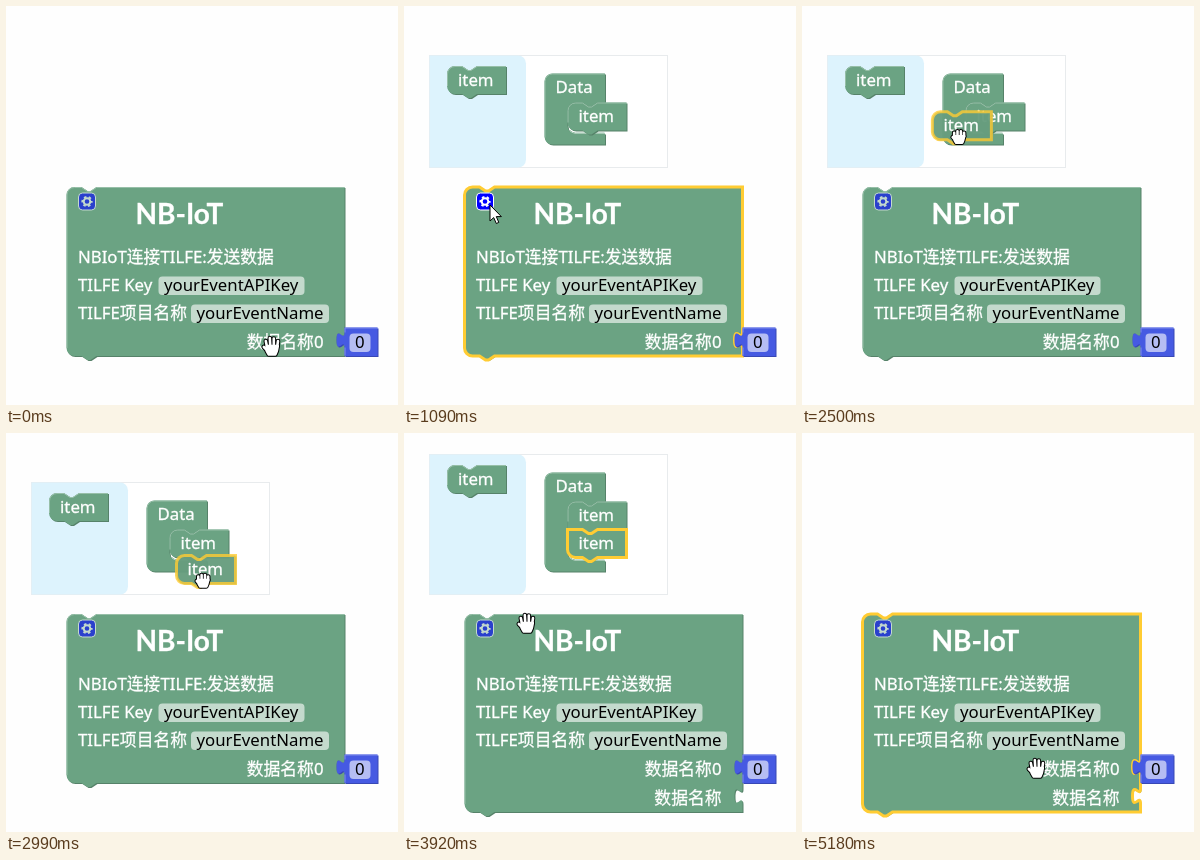
Write an HTML page that moves like this. It is 392 px wide and 399 px high and loops after 5250 ms.

```html
<!DOCTYPE html>
<html lang="zh">
<head>
<meta charset="utf-8">
<title>NB-IoT block</title>
<style>
html, body { margin: 0; width: 100%; height: 100%; overflow: hidden; background: #fefefe; }
svg { display: block; width: 392px; height: 399px; }
text {
  font: 16.8px "Noto Sans", "Noto Sans CJK SC", "Noto Sans CJK", sans-serif;
  fill: #fff; stroke: #fff; stroke-width: .3;
}
.face { fill: #6ba383; }
.dark { fill: #568269; }
.light { fill: none; stroke: #97bfa8; }
.number .face { fill: #465ae2; }
.number .dark { fill: #3848b5; }
.number .light { stroke: #7e8ceb; }
.sel .face { stroke: #fc3; stroke-width: 3; }
.sel .light { display: none; }
.drag .face, .drag .dark { fill-opacity: .8; stroke-opacity: .8; }
.field rect { fill: #fff; fill-opacity: .6; }
.field.over rect { fill-opacity: .8; }
.field text { fill: #000; stroke: none; }
#gear { opacity: .6; }
#gear.over { opacity: 1; }
.title { font: bold 28px Lato, sans-serif; }
.end { text-anchor: end; }
.off { display: none; }
</style>
</head>
<body>
<svg id="stage" viewBox="0 0 392 399"></svg>
<script>
const LOOP = 5250;
const stage = document.getElementById('stage');

const NOTCH = 'H15l6 4 3 0 6-4';
const NOTCH_BACK = 'l-6 4-3 0-6-4';
const CORNER = 'M0 8A8 8 0 0 1 8 0';
const FOOT = 'H8a8 8 0 0 1-8-8z';
const SOCKET = 'v5c0 10-8-8-8 7.5s8-2.5 8 7.5';

const itemPath = (head = CORNER, foot = FOOT) =>
  `${head}${NOTCH}H59V28H30${NOTCH_BACK}${foot}`;
const numberPath = 'M0 0H33V28.5H0V20c0-10-8 8-8-7.5s8 2.5 8-7.5z';

function mainPath(rows) {
  let d = `${CORNER}${NOTCH}H278`;
  for (let i = 0; i < rows; i++) d += `V${140.5 + 29 * i}${SOCKET}`;
  return `${d}V${140 + 29 * rows}H30${NOTCH_BACK}${FOOT}`;
}

function dataPath(items) {
  const inner = 28 * items - 13;
  return `${CORNER}H60.5V29H53${NOTCH_BACK}h-7a8 8 0 0 0-8 8v${inner}` +
    `a8 8 0 0 0 8 8H60.5v11${FOOT}`;
}

const edge = (w, h, notch) =>
  `M.5 ${h - 8}V8A7.5 7.5 0 0 1 8 .5${notch ? NOTCH : ''}H${w}`;

// Outer edge plus the lit lip under the stacked items
const dataEdge = items =>
  `${edge(60, 44 + 28 * items, false)}M25.5 ${29 + 28 * items}a8 8 0 0 0 5.5 2.5H60`;

function block(id, cls, x, y, d, light, inside = '') {
  return `<g id="${id}" class="${cls}" transform="translate(${x} ${y})">
    <path class="dark" d="${d}" transform="translate(1 1)"/>
    <path class="face" d="${d}"/><path class="light" d="${light}"/>${inside}</g>`;
}

const text = (x, y, s, cls = '') => `<text x="${x}" y="${y}" class="${cls}">${s}</text>`;

const field = (id, x, y, w, s) =>
  `<g id="${id}" class="field"><rect x="${x}" y="${y}" width="${w}" height="18.5" rx="4"/>
  ${text(x + 5.5, y + 14.5, s)}</g>`;

const item = (id, x, y) =>
  block(id, '', x, y, itemPath(), edge(59, 28, true), text(11, 19.5, 'item'));

stage.innerHTML = `
<defs>
  <g id="open" stroke-linecap="round" stroke-linejoin="round">
    <path d="M-5 0L-6-5M-1.5 0L-2-8M2 0V-7.5M5.5 0L6.2-5M-4 5L-8 1"/>
    <path d="M-5 0H6L5 5 3.5 8.5H-3L-5 5z"/>
  </g>
  <g id="fist" stroke-linecap="round" stroke-linejoin="round">
    <path d="M-4.5 0V-3.5M-1.2 0V-5M2.2 0V-5M5.4 0V-3.5M-3 4L-6 1"/>
    <path d="M-4 0H5.5L4.5 4 3.5 6.5H-2.5L-4 4z"/>
  </g>
</defs>
<g id="bubble">
  <rect id="panel" x="25.5" width="238" fill="#fff" stroke="#e8ebed"/>
  <path id="flyout" fill="#ddf3fd"/>
  <g id="content">
    ${item('spare', 43, 60)}
    ${block('data', '', 140.5, 67.5, dataPath(1), dataEdge(1), text(11, 19.5, 'Data'))}
    ${item('first', 163.5, 96.5)}
  </g>
  ${item('moving', 43, 60)}
</g>
${block('main', '', 60.5, 181, mainPath(1), edge(278, 169, true))}
<g id="gear" transform="translate(81 195.5)" fill="none" stroke="#fff">
  <rect x="-8.5" y="-8.5" width="17" height="17" rx="4" fill="#00f"/>
  <circle r="3.3" stroke-width="2"/>
  <circle r="4.7" stroke-width="1.8" stroke-dasharray="2.5 2.42" stroke-dashoffset="1.25"/>
</g>
${text(129.5, 218, 'NB-IoT', 'title')}
${text(72, 257, 'NBIoT连接TILFE:发送数据')}
${text(72, 285, 'TILFE Key')}
${field('key', 152.5, 270.5, 146, 'yourEventAPIKey')}
${text(72, 313, 'TILFE项目名称')}
${field('event', 185, 298.5, 138, 'yourEventName')}
${text(317.5, 342, '数据名称0', 'end')}
<g id="row">${text(317.5, 371, '数据名称', 'end')}</g>
${block('number', 'number', 338.5, 321.5, numberPath, 'M.5 28V20M.5 5V.5H33', field('value', 5, 6, 21, '0'))}
<g id="cursor">
  <g id="hand" transform="translate(.8 0)">
    <use stroke="#000" stroke-width="4.6"/><use fill="#fff" stroke="#fff" stroke-width="2.6"/>
  </g>
  <path id="arrow" d="M0 0V16L3.7 12.6 6.3 18.5 8.8 17.4 6.3 11.6H11.4z" fill="#fff" stroke="#000"/>
</g>`;

const $ = id => document.getElementById(id);
const flag = (id, cls, on) => $(id).classList.toggle(cls, on);
const place = (id, x, y) => $(id).setAttribute('transform', `translate(${x} ${y})`);

// Pointer moves: first step, last step (ms), step count, end x, end y
const moves = [
  [90, 90, 1, 230, 282],
  [160, 550, 6, 105, 220],
  [630, 860, 4, 86, 199],
  [1330, 1330, 1, 100, 194],
  [1560, 2030, 7, 67, 82],
  [2110, 2110, 1, 67, 84],
  [2180, 2600, 6, 167, 136],
  [2670, 2990, 5, 196, 147],
  [3150, 3290, 3, 199, 151],
  [3460, 3530, 2, 199, 153],
  [3700, 3700, 1, 209, 153],
  [3840, 3840, 1, 168, 170],
  [3920, 3920, 1, 122, 190],
  [3990, 4160, 3, 79, 202],
  [4540, 4710, 3, 79, 198],
  [4860, 5180, 5, 234, 335]
];

const easeOut = p => 1 - (1 - p) ** 2;

function pointer(t) {
  let x = 265, y = 340;
  for (const [from, to, n, endX, endY] of moves) {
    if (t < from) break;
    const gap = n > 1 ? (to - from) / (n - 1) : 1;
    const p = easeOut(Math.min(n, 1 + Math.floor((t - from + .5) / gap)) / n);
    x += (endX - x) * p;
    y += (endY - y) * p;
  }
  return [x, y];
}

function setPath(id, d, light) {
  const [dark, face, lit] = $(id).children;
  dark.setAttribute('d', d);
  face.setAttribute('d', d);
  if (light) lit.setAttribute('d', light);
}

function draw(t) {
  const [x, y] = pointer(t);
  const within = (l, top, r, b) => x >= l && x <= r && y >= top && y <= b;
  const during = (a, b) => t >= a && t < b;
  const dragging = during(2180, 3150);
  const joined = t >= 3150;
  const count = joined ? 2 : 1;
  const lift = joined ? 28 : 0;
  const top = 49.5 - lift;

  flag('bubble', 'off', !during(1090, 4860));
  $('panel').setAttribute('y', top);
  $('panel').setAttribute('height', 112 + lift);
  $('flyout').setAttribute('d', `M25.5 ${top}H114a8 8 0 0 1 8 8V153.5a8 8 0 0 1-8 8H25.5z`);
  place('content', 0, -lift);
  setPath('data', dataPath(count), dataEdge(count));

  // Stacked items meet with square corners
  setPath('first', itemPath(CORNER, joined ? 'H0z' : FOOT));
  setPath('moving', itemPath(joined ? 'M0 0' : CORNER),
    joined ? `M.5 20V.5${NOTCH}H59` : edge(59, 28, true));

  flag('moving', 'off', t < 2030);
  flag('moving', 'sel', during(2030, 4310));
  flag('moving', 'drag', dragging);
  if (joined) place('moving', 163.5, 96.5);
  else if (dragging) place('moving', x - 25.5, y - 24.5);
  else place('moving', 43, 60);

  setPath('main', mainPath(count), edge(278, 140 + 29 * count, true));
  flag('main', 'sel', during(1090, 2180) || t >= 4310);
  flag('row', 'off', !joined);

  const onGear = within(71, 186, 91, 206);
  flag('gear', 'over', onGear);
  flag('key', 'over', within(152, 270, 299, 289));
  flag('event', 'over', within(185, 298, 323, 317));

  place('cursor', x, y);
  flag('arrow', 'off', !onGear);
  flag('hand', 'off', onGear);
  for (const use of $('hand').children) use.setAttribute('href', dragging ? '#fist' : '#open');
}

function tick() {
  draw(performance.now() % LOOP);
  requestAnimationFrame(tick);
}
tick();
</script>
</body>
</html>
```
